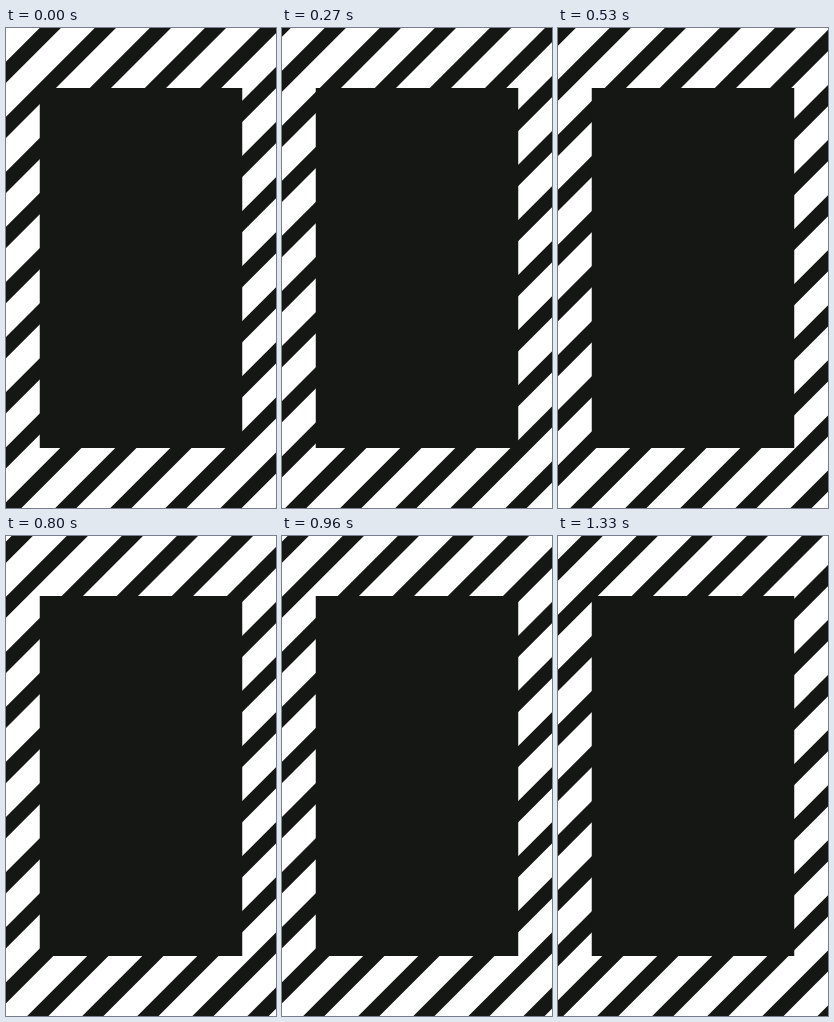
These frames come from a looping animation (270 px wide and 480 px high, 1590 ms). An HTML page:

```html
<!DOCTYPE html>
<html lang="en">
<head>
<meta charset="utf-8">
<title>Striped frame</title>
<style>
  html, body { margin: 0; width: 100%; height: 100%; overflow: hidden; background: #fff; }
  svg { display: block; width: 100%; height: 100%; fill: #141714; }
</style>
</head>
<body>
<svg viewBox="0 0 270 480" preserveAspectRatio="none">
  <path id="stripes"/>
  <rect x="33.75" y="60" width="202.5" height="360"/>
</svg>
<script>
  const PERIOD = 55.07, WIDTH = 21.2, START = 33.65, HEIGHT = 480;
  const LOOP = 1590, STEP = 9;
  const STEP_TIMES = [0, 270, 530, 800, 1070, 1330];
  const stripes = document.getElementById('stripes');

  // Diagonal bands at 45 degrees, with spare ones off the left edge.
  let d = '';
  for (let x = START - 2 * PERIOD; x < 270 + HEIGHT; x += PERIOD) {
    d += `M${x} 0h${WIDTH}l${-HEIGHT} ${HEIGHT}h${-WIDTH}z`;
  }
  stripes.setAttribute('d', d);

  // Held steps to the right; the last one jumps back by almost one period.
  const shift = i => `translateX(${i * STEP}px)`;
  const frames = STEP_TIMES.map((t, i) => ({
    offset: t / LOOP, transform: shift(i), easing: 'step-end'
  }));
  frames.push({ offset: 1, transform: shift(0) });
  stripes.animate(frames, { duration: LOOP, iterations: Infinity });
</script>
</body>
</html>
```
